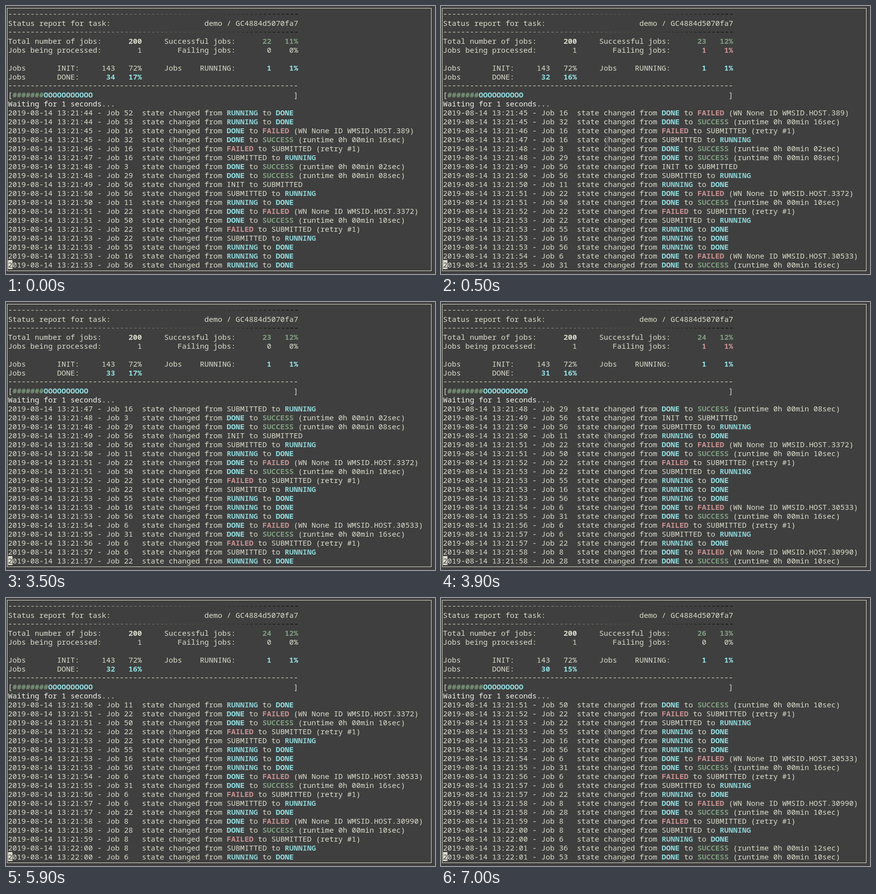
Write an HTML page that moves like this. It is 865 px wide and 539 px high and loops after 8 s.

```html
<!DOCTYPE html>
<html lang="en">
<head>
<meta charset="utf-8">
<title>Job status report</title>
<style>
  html, body { margin: 0; width: 100%; height: 100%; overflow: hidden; background: #3f3f3f; }
  .stage { position: relative; width: 865px; height: 539px; overflow: hidden; }
  .border { position: absolute; left: 2px; top: 4px; width: 854px; height: 527px; border: 1px solid #dcdccc; }
  pre {
    position: absolute; left: 4px; top: 7px; margin: 0;
    font: 15px/18px "Noto Sans Mono", "DejaVu Sans Mono", monospace;
    font-variant-ligatures: none; color: #dcdccc;
  }
  b { font-weight: 700; }
  .ok { color: #7f9f7f; }
  .bad { color: #cc9393; }
  .run { color: #8cd0d3; }
  .done { color: #93e0e3; }
  .wait { color: #f4f4ee; }
  .rule { position: relative; top: -1px; }
  .cursor { display: inline-block; height: 18px; background: #dcdccc; color: #3f3f3f; }
  svg { position: absolute; left: 328px; top: 263px; }
</style>
</head>
<body>
<div class="stage">
  <div class="border"></div>
  <pre id="screen"></pre>
  <svg width="12" height="19" fill="none">
    <defs><path id="beam" d="M2.5 1.5H4.5L5.5 2.5L6.5 1.5H8.5M5.5 2.5V16.5M2.5 17.5H4.5L5.5 16.5L6.5 17.5H8.5"/></defs>
    <use href="#beam" stroke="#e8e8e8" stroke-width="2.4"/>
    <use href="#beam" stroke="#000" stroke-width="1.4"/>
  </svg>
</div>
<script>
const LOOP = 8000, TOTAL = 200, INIT = 143, WIDTH = 65, ROWS = 18;

// time, successful, done, submitted, failing, first log line, cursor visible
const steps = [
  [0, 22, 34, 0, 0, 0, 1],
  [500, 23, 32, 0, 1, 2, 1],
  [1600, 23, 32, 1, 0, 3, 0],
  [1700, 23, 32, 1, 0, 3, 1],
  [3500, 23, 33, 0, 0, 5, 1],
  [3900, 24, 31, 0, 1, 7, 1],
  [4900, 24, 31, 1, 0, 8, 1],
  [5900, 24, 32, 0, 0, 10, 1],
  [7000, 26, 30, 0, 0, 12, 1]
];

// clock, job, change code, detail
const log = `21:44 52 RD
21:44 53 RD
21:45 16 DF 389
21:45 32 DS 16
21:46 16 FQ
21:47 16 QR
21:48 3 DS 02
21:48 29 DS 08
21:49 56 IQ
21:50 56 QR
21:50 11 RD
21:51 22 DF 3372
21:51 50 DS 10
21:52 22 FQ
21:53 22 QR
21:53 55 RD
21:53 16 RD
21:53 56 RD
21:54 6 DF 30533
21:55 31 DS 16
21:56 6 FQ
21:57 6 QR
21:57 22 RD
21:58 8 DF 30990
21:58 28 DS 10
21:59 8 FQ
22:00 8 QR
22:00 6 RD
22:01 36 DS 12
22:01 53 DS 10`.split("\n").map(logLine);

function bold(text, cls = "") {
  return `<b class="${cls}">${text}</b>`;
}

function logLine(row) {
  const [clock, job, [from, to], detail] = row.split(" ");
  const states = {
    R: bold("RUNNING", "run"), D: bold("DONE", "done"), F: bold("FAILED", "bad"),
    S: bold("SUCCESS", "ok"), Q: "SUBMITTED", I: "INIT"
  };
  const note = to === "F" ? ` (WN None ID WMSID.HOST.${detail})`
    : to === "S" ? ` (runtime 0h 00min ${detail}sec)`
    : from === "F" ? " (retry #1)" : "";
  return `2019-08-14 13:${clock} - Job ${job.padEnd(4)}state changed from ${states[from]} to ${states[to]}${note}`;
}

const percent = n => Math.round(n / TOTAL * 100) + "%";
const rule = `<span class="rule">${"-".repeat(WIDTH)}</span>`;
const fadedRule = Array.from({ length: WIDTH }, (_, i) => {
  const k = 1 - i / (WIDTH - 1);
  return `<span class="rule" style="color:rgb(${220 * k},${220 * k},${204 * k})">-</span>`;
}).join("");

// Count and share right-aligned in one column block
function figures(n, cls) {
  const text = String(n).padStart(8) + percent(n).padStart(6);
  return cls ? bold(text, cls) : text;
}
const left = (name, n, cls) => "Jobs" + (name + ":").padStart(12) + figures(n, cls);
const right = (name, n, cls) => "     " + left(name, n, cls);

function render([, success, done, submitted, failing, first, cursor]) {
  const cells = WIDTH - 2;
  const good = Math.round(success / TOTAL * cells);
  const ready = Math.round(done / TOTAL * cells);
  const lines = log.slice(first, first + ROWS);
  if (cursor) lines[ROWS - 1] = `<span class="cursor">2</span>` + lines[ROWS - 1].slice(1);
  return [
    fadedRule,
    "Status report for task:" + "demo / GC4884d5070fa7".padStart(42),
    fadedRule,
    "Total number of jobs:" + bold(String(TOTAL).padStart(9)) + "Successful jobs:".padStart(21) + figures(success, "ok"),
    "Jobs being processed:" + String(1 + submitted).padStart(9) + "Failing jobs:".padStart(21) + figures(failing, failing ? "bad" : ""),
    "",
    left("INIT", INIT) + right("RUNNING", 1, "done"),
    left("DONE", done, "done") + (submitted ? right("SUBMITTED", submitted) : ""),
    rule,
    "[" + bold("#".repeat(good), "ok") + bold("O".repeat(ready), "done") + " ".repeat(cells - good - ready) + "]",
    `<span class="wait">Waiting for 1 seconds...</span>`,
    ...lines
  ].join("\n");
}

const screen = document.getElementById("screen");
const start = performance.now();
let shown = null;

function tick() {
  const t = (performance.now() - start) % LOOP;
  const step = steps.findLast(s => s[0] <= t);
  if (step !== shown) {
    screen.innerHTML = render(step);
    shown = step;
  }
  requestAnimationFrame(tick);
}
tick();
</script>
</body>
</html>
```
